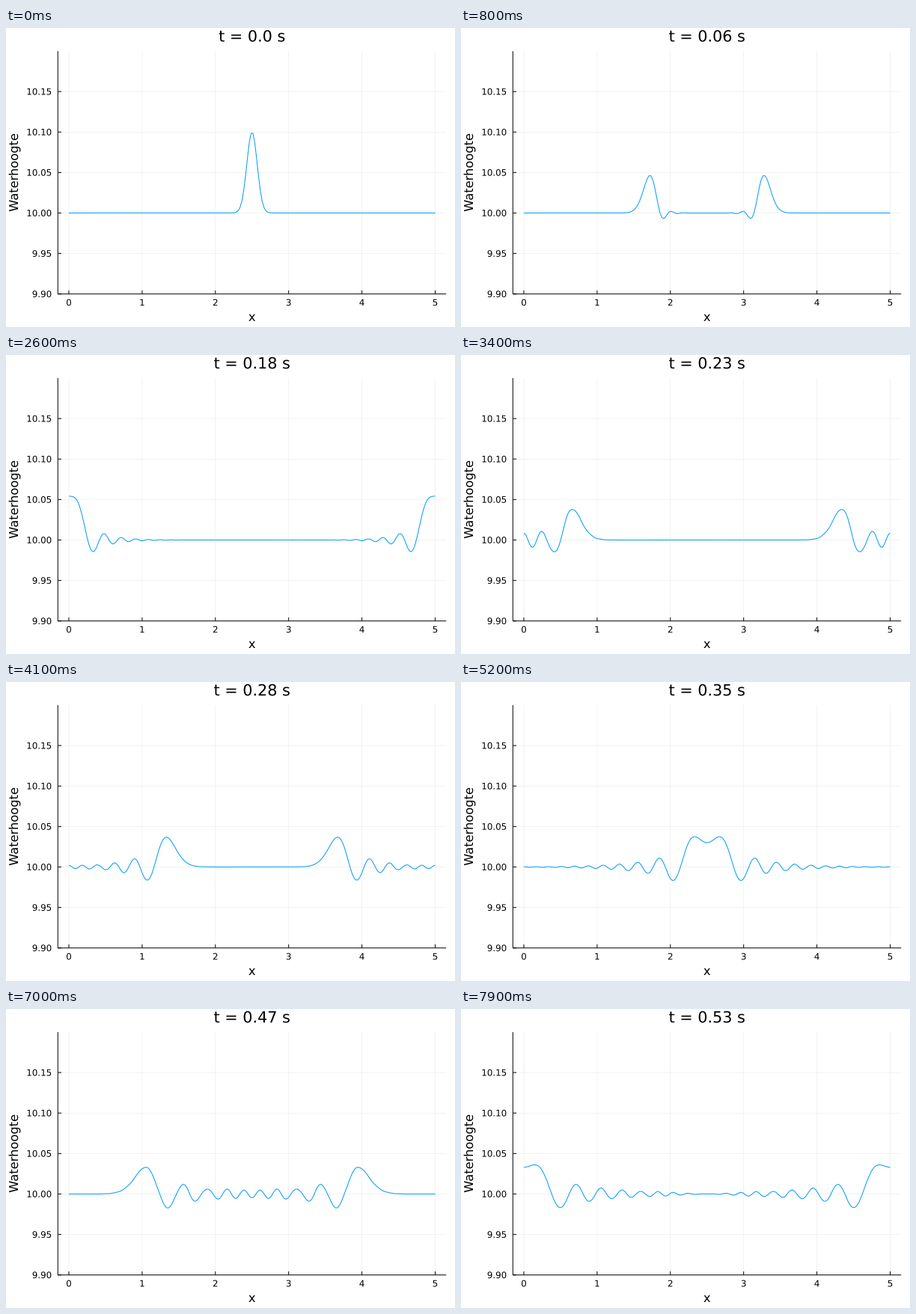
A matplotlib script that plays this animation: 600 by 400 pixels, repeating every 8 s.

```python
import numpy as np
import matplotlib.pyplot as plt
from matplotlib.animation import FuncAnimation
from matplotlib.patches import PathPatch
from matplotlib.textpath import TextPath
from matplotlib.transforms import Affine2D

FRAMES, INTERVAL = 80, 100
W, H = 600, 400
PX = 0.72  # points per pixel at 100 dpi
LEFT, RIGHT, TOP, BOTTOM = 69.3, 588.19, 30.87, 355.8
XMIN, XMAX, YMIN, YMAX = -0.15, 5.15, 9.9, 10.2
TICK = 4.72
SMALL, MEDIUM, LARGE = 11.85, 16.3, 20.74  # font sizes in pixels

plt.rcParams["font.family"] = "DejaVu Sans"


def to_x(x):
    return LEFT + (x - XMIN) / (XMAX - XMIN) * (RIGHT - LEFT)


def to_y(y):
    return BOTTOM - (y - YMIN) / (YMAX - YMIN) * (BOTTOM - TOP)


# Shallow water between two walls: central differences, RK4 in time
N, LENGTH, G = 200, 5.0, 9.81
xs = np.linspace(0, LENGTH, N)
dx = xs[1] - xs[0]


def slope(f, parity):
    """Central difference with mirrored (+1) or flipped (-1) ghost points."""
    g = np.concatenate(([parity * f[1]], f, [parity * f[-2]]))
    return (g[2:] - g[:-2]) / (2 * dx)


def rate(state):
    h, q = state
    return np.array([-slope(q, -1), -slope(q * q / h + G * h * h, 1)])


def rk4(s, dt):
    a = rate(s)
    b = rate(s + dt / 2 * a)
    c = rate(s + dt / 2 * b)
    d = rate(s + dt * c)
    return s + dt / 6 * (a + 2 * b + 2 * c + d)


def simulate(times, substeps=12):
    state = np.array([10 + 0.1 * np.exp(-100 * (xs - 2.5) ** 2), np.zeros(N)])
    heights = [state[0]]
    for dt in np.diff(times):
        for _ in range(substeps):
            state = rk4(state, dt / substeps)
        heights.append(state[0])
    return heights


# Slightly uneven time steps
times = np.interp(np.arange(FRAMES),
                  [0, 9, 16, 26, 41, 52, 70, 79],
                  [0, 0.0652, 0.1115, 0.1757, 0.279, 0.3498, 0.4674, 0.5296])
heights = simulate(times)

fig = plt.figure(figsize=(W / 100, H / 100), dpi=100, facecolor="white")
ax = fig.add_axes([0, 0, 1, 1])
ax.set_xlim(0, W)
ax.set_ylim(H, 0)
ax.axis("off")


def stroke(x, y, color="black", width=1, z=2, **kw):
    return ax.plot(x, y, color=color, lw=width * PX, zorder=z, snap=False,
                   solid_capstyle="butt", **kw)[0]


def grid(x, y):
    stroke(x, y, width=0.5, z=1, alpha=0.1)


def outline(x, y, text, size, align=0.5, turn=0):
    """Text as a path on baseline y; align is the anchored share of its width."""
    def end(s):
        return TextPath((0, 0), s, size=size).get_extents().x1

    advance = end(text + "|") - end("|")
    place = (Affine2D().translate(-align * advance, 0).rotate_deg(turn)
             .scale(1, -1).translate(x, y))
    return place.transform_path(TextPath((0, 0), text, size=size))


def label(*args, **kw):
    patch = PathPatch(outline(*args, **kw), fc="black", lw=0, snap=False)
    return ax.add_patch(patch)


for v in range(6):
    x = to_x(v)
    grid([x, x], [TOP, BOTTOM])
    stroke([x, x], [BOTTOM, BOTTOM - TICK])
    label(x, BOTTOM + 15.6, str(v), SMALL)

for v in 9.9 + 0.05 * np.arange(6):
    y = to_y(v)
    grid([LEFT, RIGHT], [y, y])
    stroke([LEFT, LEFT + TICK], [y, y])
    label(61.2, y + 4.32, f"{v:.2f}", SMALL, align=1)

stroke([LEFT, LEFT], [TOP, BOTTOM])
stroke([LEFT, RIGHT], [BOTTOM, BOTTOM])

mid_x, mid_y = (LEFT + RIGHT) / 2, (TOP + BOTTOM) / 2
label(mid_x, 392, "x", MEDIUM)
label(16, mid_y, "Waterhoogte", MEDIUM, turn=90)


def title_path(i):
    text = f"t = {round(float(times[i]), 2)} s"
    return outline(mid_x, 18.14, text, LARGE)


title = ax.add_patch(PathPatch(title_path(0), fc="black", lw=0, snap=False))
wave = stroke(to_x(xs), to_y(heights[0]), "#009afa", z=3,
              solid_joinstyle="round")


def update(i):
    wave.set_ydata(to_y(heights[i]))
    title.set_path(title_path(i))
    return wave, title


anim = FuncAnimation(fig, update, frames=FRAMES, interval=INTERVAL, repeat=True)
plt.show()
```
